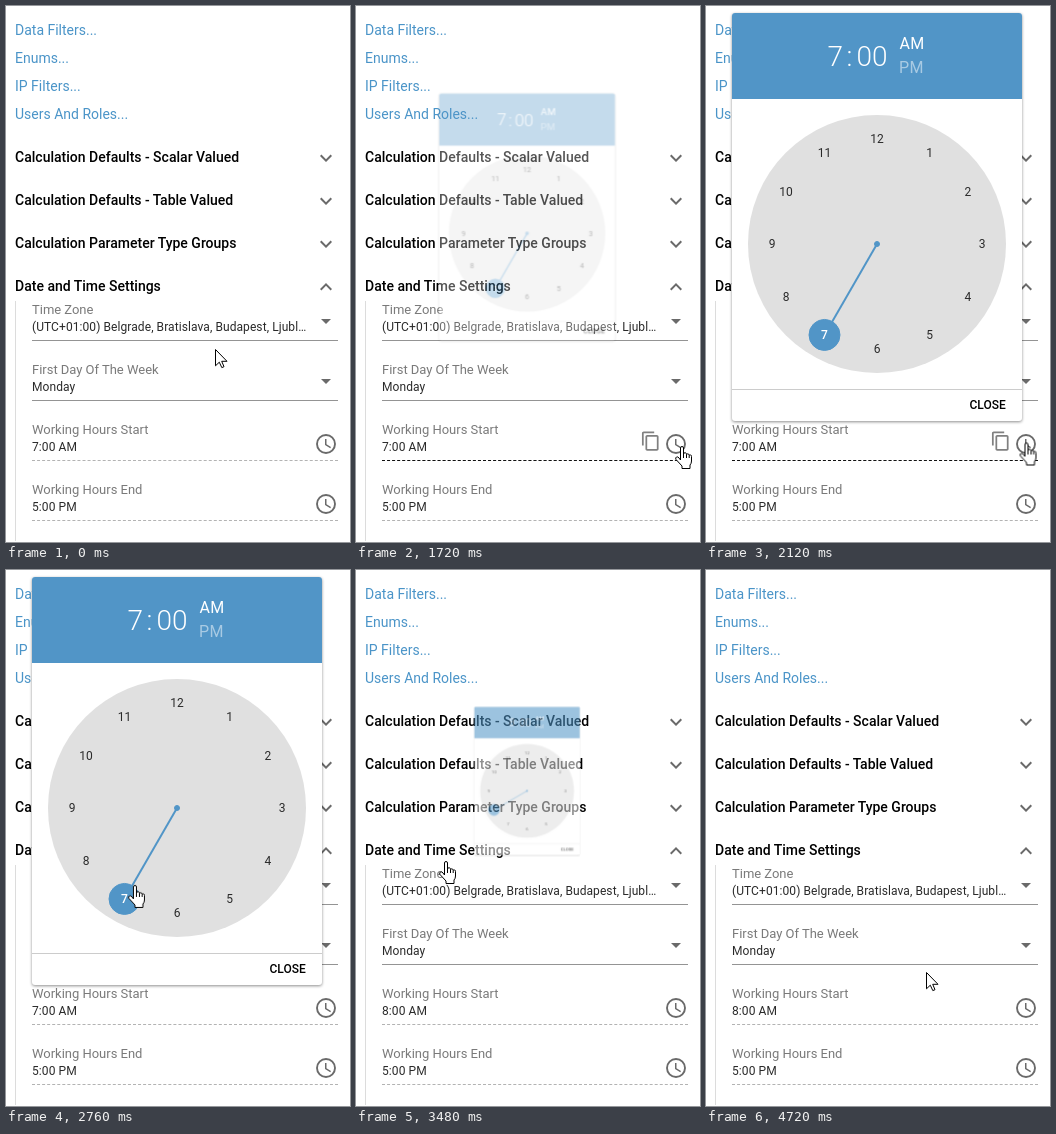
Animation, 344 px wide and 536 px high, one loop 5 s. Source, as an HTML page:

```html
<!DOCTYPE html>
<html lang="en">
<head>
<meta charset="utf-8">
<title>Date and Time Settings</title>
<style>
  html, body { margin: 0; width: 100%; height: 100%; overflow: hidden; background: #fff; }
  svg { display: block; width: 344px; height: 536px; font: 12px Roboto, sans-serif; }
  .link { font-size: 14px; fill: #4a94c8; }
  .head { font-size: 14px; font-weight: 500; fill: #000; }
  .label { font-size: 13px; letter-spacing: -.02px; fill: #7a7a7a; }
  .value { letter-spacing: .08px; fill: #2a2a2a; }
  .icon { fill: #6a6a6a; }
  .line { fill: none; stroke: #949494; }
  .dash { fill: none; stroke: #b3b3b3; stroke-dasharray: 3 2.05; }
  .hover .line, .hover .dash { stroke: #111; }
  .blue { fill: #5195c7; stroke: #5195c7; }
  .num { text-anchor: middle; fill: #2a2a2a; }
  .clock { font-size: 28px; font-weight: 300; fill: #fff; }
  .half { font-size: 16px; letter-spacing: .4px; fill: #fff; }
  .pointer path { fill: #fff; stroke: #000; stroke-linejoin: round; }

  /* Hard switches; one loop is 5 s, so 1% is 50 ms */
  .before, .after, .zone, .day, .start, .hand, .arrow { animation: 5s step-end infinite; }
  .before { animation-name: before; }
  .after { animation-name: after; }
  .zone { animation-name: zone; }
  .day { animation-name: day; }
  .start { animation-name: start; }
  .hand { animation-name: hand; }
  .arrow { animation-name: arrow; }
  @keyframes before { 0% { opacity: 1 } 67.2%, 100% { opacity: 0 } }
  @keyframes after { 0% { opacity: 0 } 67.2%, 100% { opacity: 1 } }
  @keyframes zone { 0%, 81.5%, 100% { opacity: 0 } 76.6% { opacity: 1 } }
  @keyframes day { 0%, 20.8%, 92.2%, 100% { opacity: 0 } 15.1%, 83% { opacity: 1 } }
  @keyframes start { 0%, 45%, 100% { opacity: 0 } 22.3% { opacity: 1 } }
  @keyframes hand {
    0%, 20.8%, 45%, 81.5%, 92.2%, 100% { opacity: 0 }
    15.1%, 22.3%, 49.5%, 83% { opacity: 1 }
  }
  @keyframes arrow {
    0%, 20.8%, 45%, 81.5%, 92.2%, 100% { opacity: 1 }
    15.1%, 22.3%, 49.5%, 83% { opacity: 0 }
  }

  .pointer { animation: move 5s cubic-bezier(.39, .575, .565, 1) infinite; }
  @keyframes move {
    0%, 14% { transform: translate(209px, 343px) }
    30.4% { transform: translate(324px, 440px) }
    41.6% { transform: translate(324px, 440px); animation-timing-function: cubic-bezier(.3, .1, .65, .85) }
    55.2% { transform: translate(127px, 315px) }
    64.8%, 76.2% { transform: translate(88px, 291px) }
    94.4%, 100% { transform: translate(220px, 402px) }
  }

  .dialog { transform-origin: 171px 211px; animation: zoom 5s infinite, fade 5s linear infinite; }
  .card { fill: #fff; filter: drop-shadow(0 1px 1.5px rgba(0, 0, 0, .45)); }
  @keyframes zoom {
    0% { transform: scale(0) }
    32.8% { transform: scale(0); animation-timing-function: cubic-bezier(.215, .61, .355, 1) }
    39.2% { transform: scale(1) }
    67.2% { transform: scale(1); animation-timing-function: cubic-bezier(.05, .1, .55, 1) }
    72.8%, 100% { transform: scale(0) }
  }
  @keyframes fade {
    0%, 32.8% { opacity: 0 }
    37.6%, 67.2% { opacity: 1 }
    72.8%, 100% { opacity: 0 }
  }
</style>
</head>
<body>
<svg viewBox="0 0 344 536">
  <defs>
    <path id="more" d="M16.59 8.59L12 13.17 7.41 8.59 6 10l6 6 6-6z"/>
    <path id="less" d="M12 8l-6 6 1.41 1.41L12 10.83l4.59 4.58L18 14z"/>
    <path id="drop" d="M315 0h10l-5 5z"/>
    <g id="time">
      <circle cx="12" cy="12" r="9" fill="none" stroke="#6a6a6a" stroke-width="1.9"/>
      <path d="M12.5 7H11v6l5.25 3.15.75-1.23-4.5-2.67z"/>
    </g>
    <path id="copy" d="M16 1H4c-1.1 0-2 .9-2 2v14h2V3h12V1zm3 4H8c-1.1 0-2 .9-2 2v14c0 1.1.9 2 2 2h11c1.1 0 2-.9 2-2V7c0-1.1-.9-2-2-2zm0 16H8V7h11v14z"/>
    <path id="rule" d="M26 .5H332"/>
  </defs>

  <g class="link">
    <text x="9" y="29">Data Filters...</text>
    <text x="9" y="57">Enums...</text>
    <text x="9" y="85">IP Filters...</text>
    <text x="9" y="113">Users And Roles...</text>
  </g>

  <g class="head">
    <text x="9" y="156">Calculation Defaults - Scalar Valued</text>
    <text x="9" y="199">Calculation Defaults - Table Valued</text>
    <text x="9" y="242">Calculation Parameter Type Groups</text>
    <text x="9" y="285">Date and Time Settings</text>
  </g>

  <path d="M9.5 295V535" stroke="#dcdcdc"/>

  <g class="label">
    <text x="26" y="308">Time Zone</text>
    <text x="26" y="368">First Day Of The Week</text>
    <text x="26" y="428">Working Hours Start</text>
    <text x="26" y="488">Working Hours End</text>
  </g>

  <g class="value">
    <text x="26" y="325">(UTC+01:00) Belgrade, Bratislava, Budapest, Ljubl…</text>
    <text x="26" y="385">Monday</text>
    <text class="before" x="26" y="445">7:00 AM</text>
    <text class="after" x="26" y="445">8:00 AM</text>
    <text x="26" y="505">5:00 PM</text>
  </g>

  <use class="line" href="#rule" y="334"/>
  <use class="line" href="#rule" y="394"/>
  <use class="dash" href="#rule" y="454"/>
  <use class="dash" href="#rule" y="514"/>

  <g class="icon">
    <use href="#more" x="308" y="140"/>
    <use href="#more" x="308" y="183"/>
    <use href="#more" x="308" y="226"/>
    <use href="#less" x="308" y="269"/>
    <use href="#drop" y="313"/>
    <use href="#drop" y="373"/>
    <use href="#time" x="308" y="426"/>
    <use href="#time" x="308" y="486"/>
  </g>

  <g class="hover">
    <g class="zone"><use class="line" href="#rule" y="334"/></g>
    <g class="day"><use class="line" href="#rule" y="394"/></g>
    <g class="start">
      <use class="dash" href="#rule" y="454"/>
      <use href="#copy" transform="translate(284.2 424.6) scale(.875)" fill="#808080"/>
    </g>
  </g>

  <g class="dialog">
    <rect class="card" x="26" y="7" width="290" height="408" rx="3"/>
    <path d="M26 93V10a3 3 0 0 1 3-3H313a3 3 0 0 1 3 3V93z" fill="#5195c7"/>
    <g class="clock">
      <text x="140.5" y="60">:</text>
      <text x="150.5" y="60">00</text>
    </g>
    <text class="half" x="193.5" y="43">AM</text>
    <text class="half" x="193" y="67" opacity=".5">PM</text>
    <circle cx="171" cy="238" r="129" fill="#e0e0e0"/>
    <g id="dial"></g>
    <path d="M26 383.5H316" stroke="#ccc"/>
    <text x="263.5" y="403" font-weight="500">CLOSE</text>
  </g>

  <g class="pointer">
    <path class="arrow" d="M.5.5V16.8L4.3 13.2 6.8 18.6 9 17.7 6.7 12.3H12z"/>
    <g class="hand" transform="translate(-5 0)">
      <path d="M5.5 14V2a1.5 1.5 0 0 1 3 0v6a1.5 1.5 0 0 1 3 .5a1.5 1.5 0 0 1 2.7.7a1.4 1.4 0 0 1 2.3 1.3V15q0 2.5-1.5 4v3.5H7V20L1 13.5q-1-1.8.5-2.5t2.5 1z"/>
      <path d="M8.5 8v4M11.5 8.5V12M14.2 9.2V12"/>
    </g>
  </g>
</svg>
<script>
  const spot = hour => {
    const a = hour * Math.PI / 6;
    return [171 + 105 * Math.sin(a), 238 - 105 * Math.cos(a)];
  };

  const num = (hour, attrs = '') => {
    const [x, y] = spot(hour);
    return `<text class="num" x="${x}" y="${y + 4.2}" ${attrs}>${hour}</text>`;
  };

  const picked = (hour, state) => {
    const [x, y] = spot(hour);
    return `<g class="${state}">
      <text class="clock" x="121.5" y="60">${hour}</text>
      <path class="blue" stroke-width="2" d="M171 238L${x} ${y}"/>
      <circle class="blue" cx="${x}" cy="${y}" r="15.5"/>
      ${num(hour, 'style="fill:#fff;font-weight:500"')}
    </g>`;
  };

  const hours = Array.from({ length: 12 }, (_, i) => num(i + 1)).join('');
  document.getElementById('dial').innerHTML = hours
    + picked(7, 'before') + picked(8, 'after')
    + '<circle class="blue" cx="171" cy="238" r="2.5"/>';
</script>
</body>
</html>
```
